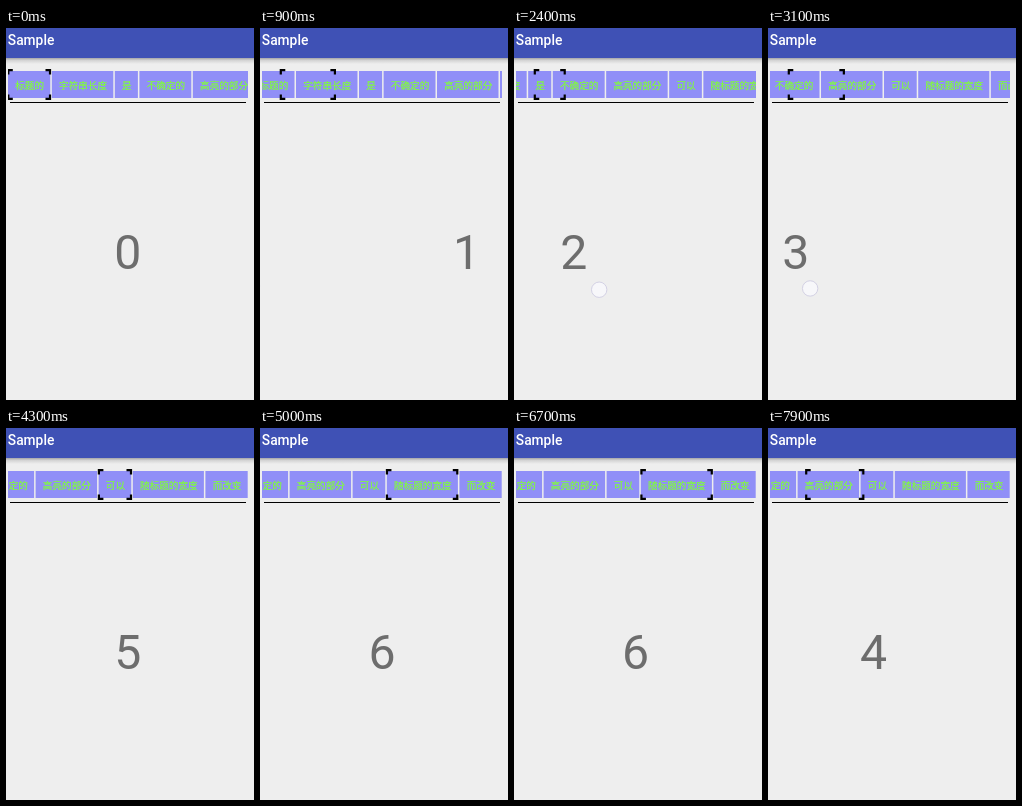
An HTML page for the animation above (8 s loop, 248 by 372 pixels).

```html
<!DOCTYPE html>
<html lang="zh-CN">
<head>
<meta charset="utf-8">
<title>Tab strip</title>
<style>
  html, body { margin: 0; width: 100%; height: 100%; overflow: hidden; background: #eee; }
  svg { display: block; width: 100vw; height: 100vh; }
  .title { font: 500 13.8px Roboto, sans-serif; fill: #fff; }
  .label { font: 9.6px "Noto Sans CJK SC", "Noto Sans CJK", sans-serif; fill: #80ff38; stroke: #80ff38; stroke-width: .2; }
  .digit { font: 48.2px Roboto, sans-serif; fill: #6d6d6d; text-anchor: middle; }
</style>
</head>
<body>
<svg viewBox="0 0 248 372">
  <defs>
    <linearGradient id="shade" x2="0" y2="1">
      <stop offset="0" stop-color="#a4a4a8"/>
      <stop offset=".4" stop-color="#d4d4d4"/>
      <stop offset="1" stop-color="#eee"/>
    </linearGradient>
    <clipPath id="view"><rect x="2" y="40" width="240" height="332"/></clipPath>
  </defs>
  <rect width="248" height="372" fill="#eee"/>
  <rect y="30" width="248" height="6" fill="url(#shade)"/>
  <rect width="248" height="30" fill="#3f51b5"/>
  <text class="title" x="1.8" y="17">Sample</text>
  <g clip-path="url(#view)">
    <g id="strip"></g>
    <path id="frame" fill="none" stroke="#000" stroke-width="2.2"/>
    <g id="pages"></g>
  </g>
  <rect x="4" y="74" width="236" height="1" fill="#000"/>
  <circle id="finger" r="7.7" fill="#f7f7fb" fill-opacity=".9" stroke="#d3d1e4" stroke-width="1"/>
</svg>
<script>
const LOOP = 8000, STEP = 100;
const PAGE = 240, CENTER = 121.7;
const CHAR = 9.6, PAD = 6.75, GAP = 1.5;
const ANCHOR = 20.5, MAX_SCROLL = 157.2;
const LABELS = ["标题的", "字符串长度", "是", "不确定的", "高亮的部分", "可以", "随标题的宽度", "而改变"];
const LAST = LABELS.length - 1;

// Every swipe turns one page: a drag, then a settle; only the lift times are free
const DRAG = 300, SETTLE = 290, LAG = 30, SHARE = .646;
const LIFTS = [900, 1600, 2520, 3173, 3900, 4800, 5572, 6500, 7015, 7818];

const $ = id => document.getElementById(id);
const clamp = (v, lo, hi) => Math.min(hi, Math.max(lo, v));
const mix = (a, b, k) => a + (b - a) * k;

function add(parent, tag, attrs, text = "") {
  const el = document.createElementNS("http://www.w3.org/2000/svg", tag);
  for (const key in attrs) el.setAttribute(key, attrs[key]);
  el.textContent = text;
  return parent.appendChild(el);
}

let edge = 2;
const tabs = LABELS.map(label => {
  const width = label.length * CHAR + 2 * PAD;
  const tab = { left: edge, right: edge + width };
  add($("strip"), "rect", { x: edge, y: 43, width, height: 27, fill: "#908ff7" });
  add($("strip"), "text", { class: "label", x: edge + PAD + .5, y: 60.7 }, label);
  edge += width + GAP;
  return tab;
});
const digits = LABELS.map((_, i) => add($("pages"), "text", { class: "digit", y: 240.8 }, i));

// Page after n swipes: up to the last one, then back
const pageAfter = n => LAST - Math.abs(LAST - n);

// Accelerating drag, then a quintic settle; dt counts from the lift
function progress(dt) {
  if (dt <= 0) return SHARE * clamp(1 + dt / DRAG, 0, 1) ** 1.8;
  return 1 - (1 - SHARE) * (1 - Math.min(dt / SETTLE, 1)) ** 5;
}

function drawStrip(pos) {
  const i = Math.floor(pos), a = tabs[i], b = tabs[Math.min(i + 1, LAST)];
  const left = mix(a.left, b.left, pos - i), right = mix(a.right, b.right, pos - i);
  const scroll = clamp(left - ANCHOR, 0, MAX_SCROLL);
  $("strip").setAttribute("transform", `translate(${-scroll} 0)`);

  const corner = (x, y, dx, dy) => `M${x + dx} ${y}H${x}V${y + dy}`;
  const l = left - scroll + .3, r = right - scroll - .3, arm = 4.5;
  $("frame").setAttribute("d",
    corner(l, 42.1, arm, arm) + corner(r, 42.1, -arm, arm) +
    corner(l, 70.9, arm, -arm) + corner(r, 70.9, -arm, -arm));
}

// The thumb starts near the middle with a slight sway, lower in the later swipes
function drawFinger(n, dir, dt) {
  const touching = dt >= -DRAG && dt <= 0;
  $("finger").style.display = touching ? "" : "none";
  if (!touching) return;
  const start = 147 + 11 * Math.sin(n * Math.PI / 2);
  const moved = progress(dt) * PAGE;
  $("finger").setAttribute("cx", dir > 0 ? start - moved : 230 - start + moved);
  $("finger").setAttribute("cy", (n < 5 ? 258 : 276) + .04 * (SHARE * PAGE - moved));
}

function draw(time) {
  const t = Math.floor(time % LOOP / STEP) * STEP;
  const n = Math.max(0, LIFTS.filter(lift => lift - DRAG <= t).length - 1);
  const from = pageAfter(n), to = pageAfter(n + 1), dt = t - LIFTS[n];
  const at = u => mix(from, to, progress(u));

  const pos = at(dt);
  digits.forEach((d, i) => d.setAttribute("x", CENTER + (i - pos) * PAGE));
  // The strip trails the pages slightly while they settle
  drawStrip(dt > 0 ? at(Math.max(0, dt - LAG)) : pos);
  drawFinger(n, to - from, dt);
}

const start = performance.now();
function tick() {
  draw(performance.now() - start);
  requestAnimationFrame(tick);
}
tick();
</script>
</body>
</html>
```
